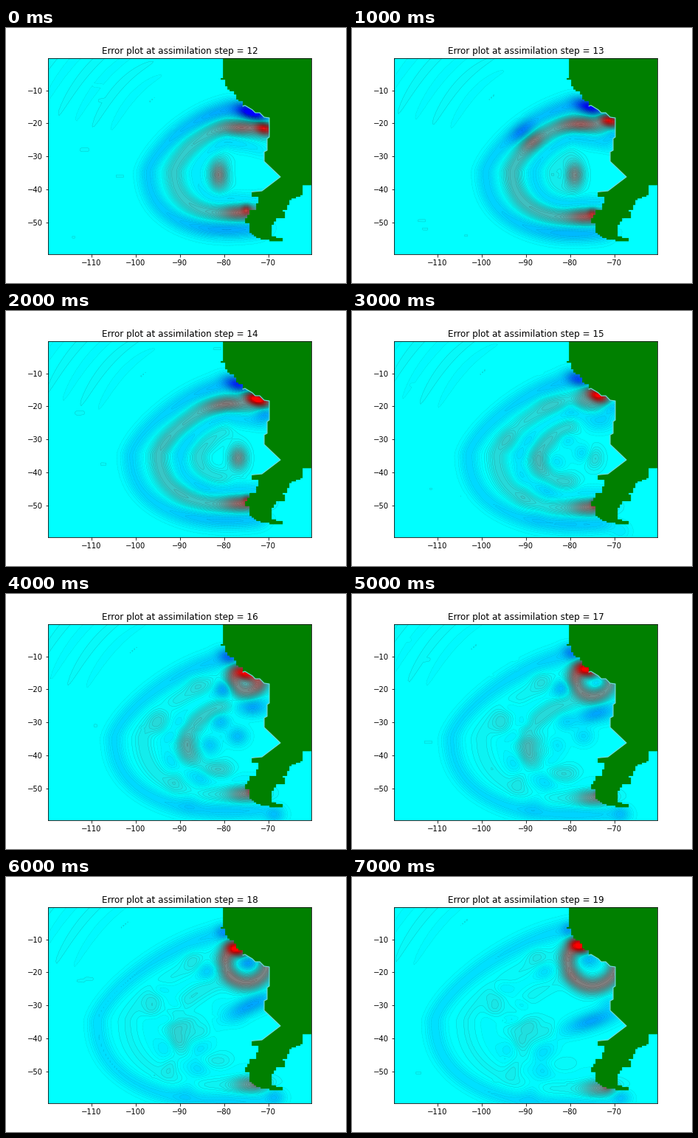
A matplotlib script that plays this animation: 461 px wide and 346 px high, repeating every 8000 ms.

```python
import numpy as np
import matplotlib.pyplot as plt
from matplotlib.animation import FuncAnimation
from matplotlib.colors import LinearSegmentedColormap

W, H, DPI = 461, 346, 72
FIRST_STEP, FRAMES = 12, 8
WEST, EAST, SOUTH, NORTH = -119.75, -60.25, -59.75, -0.25
LEFT, RIGHT, TOP, BOTTOM = 57.1, 414.2, 41.1, 307.3
CELL_X, CELL_Y = (RIGHT - LEFT) / 119, (BOTTOM - TOP) / 119
HUB = 300, 195

plt.rcParams["font.family"] = "DejaVu Sans"
fig = plt.figure(figsize=(W / DPI, H / DPI), dpi=DPI)
ax = fig.add_axes([LEFT / W, 1 - BOTTOM / H, (RIGHT - LEFT) / W, (BOTTOM - TOP) / H])
cmap = LinearSegmentedColormap.from_list("error", ["blue", "cyan", "red"], N=512)

# The field is built in stage pixels and shown in degrees.
X, Y = np.meshgrid(np.linspace(LEFT, RIGHT, 120), np.linspace(TOP, BOTTOM, 120))
DX, DY = X - HUB[0], Y - HUB[1]
R = np.hypot(DX, DY) + 1e-6


def degrees(x, y):
    return (WEST + (np.asarray(x) - LEFT) / (RIGHT - LEFT) * (EAST - WEST),
            NORTH - (np.asarray(y) - TOP) / (BOTTOM - TOP) * (NORTH - SOUTH))


def ease(u):
    u = np.clip(u, 0, 1)
    return u * u * (3 - 2 * u)


def bump(t, centre, width):
    return np.exp(-((t - centre) / width) ** 2)


def spot(x, y, sx, sy, amp, tilt=0):
    """Gaussian blob, turned clockwise by tilt."""
    c, s = np.cos(tilt), np.sin(tilt)
    u, v = (X - x) * c + (Y - y) * s, (Y - y) * c - (X - x) * s
    return amp * np.exp(-((u / sx) ** 2 + (v / sy) ** 2) / 2)


def front(rx, top, bottom, amp, ends=0, fade=352, width=8.5):
    """Wave front around the hub: pointed to the north-west, round to the south."""
    power = np.where(DY < 0, 1.45, 2.3)
    across = np.abs(DX) / np.where(DX < 0, rx, 2 * rx)
    along = np.abs(DY) / np.where(DY < 0, top, bottom)
    q = (across ** power + along ** power) ** (1 / power) + 1e-6
    strength = amp + ends * (DY / R) ** 4
    return strength * np.exp(-((R - R / q) / width) ** 2 / 2) / (1 + np.exp((X - fade) / 5))


def arc(x, y, radius, amp, width=8):
    return amp * np.exp(-((np.hypot(X - x, Y - y) - radius) / width) ** 2 / 2)


def coast(length):
    """Point at a given distance northwards along the shore."""
    marks = [0, 15, 47, 67, 92]
    return (np.interp(length, marks, [352, 349, 322, 308, 294]),
            np.interp(length, marks, [140, 125, 107, 93, 72]))


def open_sea(t):
    decay = np.exp(-t / 4)
    z = front(107 + 11.5 * t, 83 + 6 * t, 78 + 5.2 * t, -.12 - .08 * decay, -.15 * decay)
    z += front(72 + 10.5 * t, 61 + 4 * t, 56 + 5.3 * t, .04 + .22 * bump(t, 1.2, 2.2), .08 * decay)
    z += front(42 + 10.5 * t, 43 + 5 * t, 40 + 5 * t, -.03 - .13 * bump(t, 1.6, 1.8), -.08 * decay)
    z += front(20 + 9 * t, 20 + 6 * t, 20 + 6 * t, .03 + .2 * bump(t, 3.6, 2.2), fade=303)
    # Core, and the pair that flares up in the north-west
    z += spot(289 + 13 * t, 199, 8, 13 - t, .47 * (1 - ease((t - 1.8) / 2)))
    flare = bump(t, 1, .6)
    z += spot(231, 141, 13, 7, -.35 * flare, -.65) + spot(244, 153, 13, 7, .3 * flare, -.65)
    # Troughs left inside the rings
    for x, y in (290, 173), (275, 205), (314, 193):
        z += spot(x, y, 9, 8, -.26 * bump(t, 4, 1.3))
    return z


def near_shore(t):
    d = max(t - 4, 0)
    late = ease((t - 2.4) / 1.6)
    z = spot(*coast(33 + 14 * t - .8 * t * t), 15 - 1.2 * t, 6.5, -.95 * np.exp(-t / 5), .35)
    z += spot(*coast(4 + 11.5 * t - .4 * t * t), 9 + 3 * bump(t, 2, 1), 5.5, .8 + .4 * bump(t, 2, 1), .35)
    x, y = coast(8.5 * t - 12)
    z += spot(x, y + 4, 10, 7, -.42 * abs(np.cos(np.pi * (t - 2) / 4)))
    z += arc(326, 115, 5 * t - 2, .5 * late)
    # Top end of the crest, then the troughs thrown off by the growing arc
    z += spot(322 - 12 * t, 134 - 3.5 * t, 20, 7, .33 * (1 - ease((t - 1.5) / 2)), -.1)
    z += spot(334 - 3 * d, 153 + 6 * d + 2.7 * d * d, 14 + 4 * d, 8, -.36 * late, -.45 * np.sin(np.pi * d / 4))
    z += spot(296 - 12 * d, 127, 9, 9, -.4 * late * np.exp(-d / 2.5))
    z += spot(348, 163 + 3 * d, 9, 8, -.12 * d / 3)
    # Southern end
    x, y = 318 + .4 * t * t, 250 + 5.2 * t
    z += spot(x, y, 17, 7.5, .36) + spot(x + 8, y - 4, 4, 4, .3)
    z += spot(364, 299, 9, 8, -.25 * late)
    return z


def scatter(t):
    """Weak leftovers drifting outwards inside the rings."""
    rng = np.random.default_rng(5)
    z = 0
    for k in range(16):
        angle, reach = rng.uniform(1.8, 4.4), rng.uniform(35, 115)
        reach *= .75 + .05 * t
        z = z + spot(HUB[0] + reach * np.cos(angle), HUB[1] - .85 * reach * np.sin(angle),
                     rng.uniform(7, 14), rng.uniform(6, 10),
                     (-1) ** k * .09 * ease((t - 1) / 4), rng.uniform(-1.2, 0))
    return z


def far_field(t):
    """Faint waves and specks, just strong enough to raise contour lines."""
    angle = np.arctan2(-DY, -DX)
    reach = np.hypot(DX, 1.2 * DY)
    wave = np.cos((reach - 9 * t) / 8 + .6 * np.sin(5 * angle))
    z = .017 * bump(angle, .65, .6) * wave / (1 + np.exp((145 + 9 * t - reach) / 8))
    rng = np.random.default_rng(FIRST_STEP + int(t))
    for _ in range(9):
        i, j = rng.integers(4, 114, 2)
        z[i:i + 2, j:j + rng.integers(2, 5)] += .014
    return z


def snap(x, y):
    return LEFT + round((x - LEFT) / CELL_X) * CELL_X, TOP + round((y - TOP) / CELL_Y) * CELL_Y


def stairs(*points):
    """Joins points with steps on the half-degree grid."""
    path = [snap(*points[0])]
    for (x0, y0), (x1, y1) in zip(points, points[1:]):
        n = max(1, round(min(abs(x1 - x0) / CELL_X, abs(y1 - y0) / CELL_Y)))
        for u in np.arange(1, n + 1) / n:
            x, y = snap(x0 + (x1 - x0) * u, y0 + (y1 - y0) * u)
            path += [(path[-1][0], y), (x, y)]
    return path


north = stairs((294, 41), (294, 53), (292, 67), (298, 70), (298, 75), (311, 90), (313, 96), (320, 100), (320, 105))
shore = [(324, 105), (334, 111), (338, 115), (344, 115), (350, 121), (357, 122), (357, 148),
         (354, 150), (354, 166), (350, 168), (350, 181), (372, 202), (347, 221)]
south = stairs((333, 222), (333, 228), (342, 229), (342, 234), (338, 237), (338, 246), (331, 247),
               (324, 258), (324, 264), (329, 265), (332, 278), (345, 285), (357, 287), (357, 290),
               (374, 290), (374, 286), (360, 282), (360, 271), (368, 258), (378, 257), (378, 251),
               (373, 247), (380, 246), (386, 234), (394, 232), (402, 226), (405, 213), (416, 213))
land = degrees(*np.transpose(north + shore + south + [(416, 41)]))
rim = degrees(*np.transpose([north[-1]] + shore + [south[0]]))

fills = np.arange(-1.0125, 1.02, .025)


def draw(frame):
    ax.clear()
    z = open_sea(frame) + near_shore(frame) + scatter(frame) + far_field(frame)
    z = np.clip(z, -1, 1)
    lon, lat = degrees(X, Y)
    ax.contourf(lon, lat, z, fills, cmap=cmap, vmin=-1, vmax=1)
    ax.contour(lon, lat, z, fills, colors="k", linewidths=.25, alpha=.35)
    ax.fill(*land, color="green", lw=0, zorder=2.4)
    ax.plot(*rim, color="#6fdcdc", lw=1.2, zorder=2.45)
    ax.set(xlim=(WEST, EAST), ylim=(SOUTH, NORTH),
           xticks=range(-110, -69, 10), yticks=range(-50, -9, 10))
    ax.set_title(f"Error plot at assimilation step = {FIRST_STEP + frame}")


anim = FuncAnimation(fig, draw, frames=FRAMES, interval=1000, init_func=lambda: None,
                     repeat=True, repeat_delay=0)
plt.show()
```
